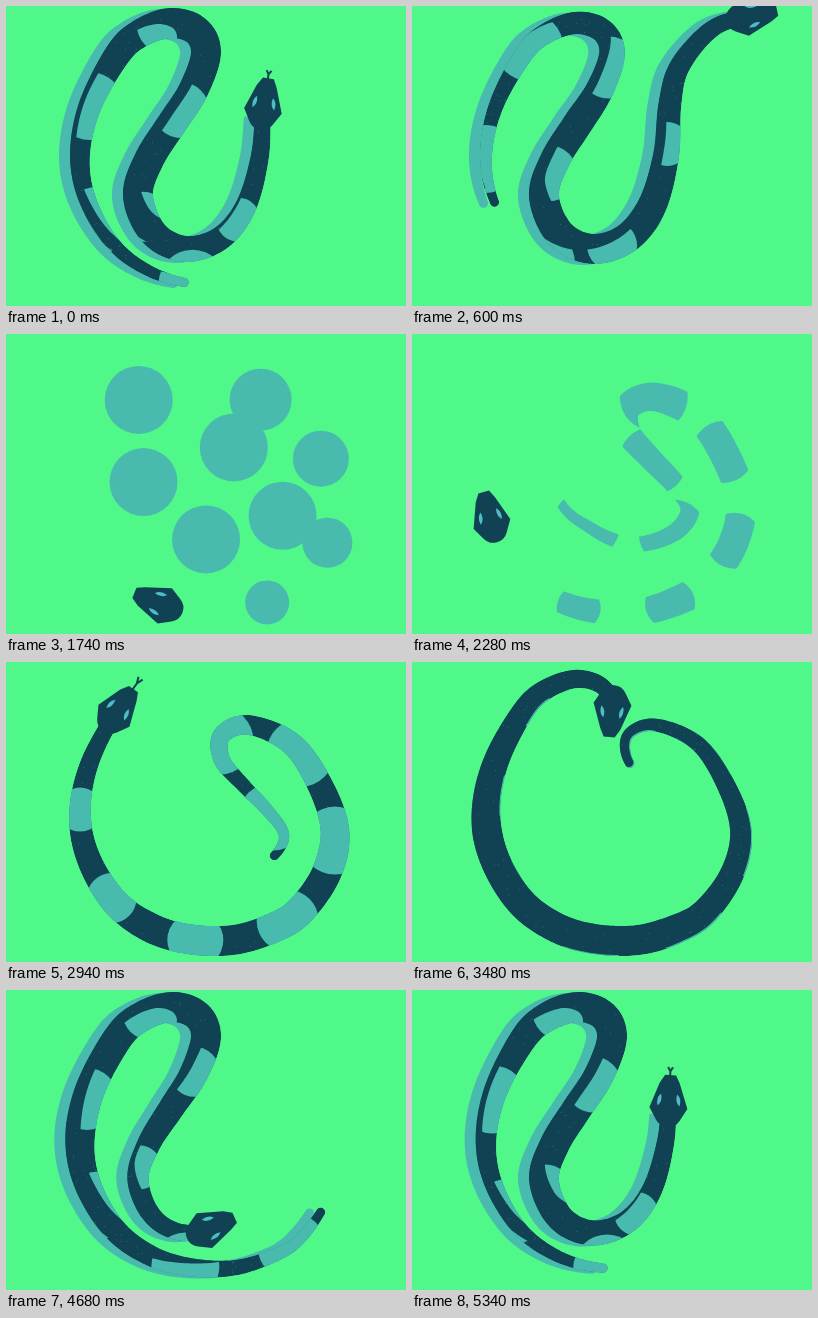
Write an HTML page with a canvas that moves like this. It is 400 by 300 pixels and loops after 5.4 s.

```html
<!DOCTYPE html>
<html>
<head>
<meta charset="utf-8">
<title>Snake</title>
<style>
html, body { margin: 0; width: 100%; height: 100%; overflow: hidden; background: #50f789; }
canvas { display: block; }
</style>
</head>
<body>
<canvas id="stage" width="400" height="300"></canvas>
<script>
const ctx = document.getElementById('stage').getContext('2d');
const GREEN = '#50f789', DARK = '#104254', TEAL = '#48bbae', EYE = '#4fbdc6';
const LOOP = 5400, STEP = 60, CUT = 700;

// Route the head follows; the body trails along it.
const route = [
  [300, -40], [225, -8], [169, 27], [122, 90], [147, 166], [180, 195], [212, 209], [240, 208],
  [267, 195], [278, 173], [262, 149], [238, 124], [216, 98], [216, 73], [243, 63], [286, 82],
  [315, 125], [329, 170], [320, 212], [294, 249], [267, 266], [227, 278], [182, 277], [143, 265],
  [108, 239], [82, 195], [74, 150], [84, 100], [112, 48], [135, 27], [165, 17], [191, 25],
  [200, 48], [187, 85], [165, 119], [143, 154], [132, 190], [148, 228], [180, 243], [215, 232],
  [240, 200], [254, 150], [258, 98], [268, 60], [300, 23], [338, 10], [390, 2]
];
const DETAIL = 24;
const samples = [];

function catmull(a, b, c, d, t) {
  return b + 0.5 * t * (c - a + t * (2 * a - 5 * b + 4 * c - d + t * (3 * (b - c) + d - a)));
}
for (let i = 0, s = 0; i < route.length - 1; i++) {
  const p = [-1, 0, 1, 2].map(k => route[Math.min(route.length - 1, Math.max(0, i + k))]);
  for (let j = 0; j < DETAIL; j++) {
    const [x, y] = [0, 1].map(n => catmull(p[0][n], p[1][n], p[2][n], p[3][n], j / DETAIL));
    const last = samples[samples.length - 1];
    if (last) s += Math.hypot(x - last.x, y - last.y);
    samples.push({ x, y, s });
  }
}
const lengthAt = (x, y) => samples[DETAIL * route.findIndex(p => p[0] === x && p[1] === y)].s;
const endS = lengthAt(258, 98);
const startS = lengthAt(267, 266);
const SPEED = (endS - startS) / 4200;
const LENGTH = endS - lengthAt(182, 277);

function pointAt(s) {
  let lo = 0, hi = samples.length - 1;
  while (hi - lo > 1) {
    const mid = (lo + hi) >> 1;
    if (samples[mid].s > s) hi = mid; else lo = mid;
  }
  const a = samples[lo], b = samples[hi], f = (s - a.s) / (b.s - a.s);
  return {
    x: a.x + (b.x - a.x) * f,
    y: a.y + (b.y - a.y) * f,
    angle: Math.atan2(b.y - a.y, b.x - a.x)
  };
}

// time, distance from head to first band, distance between bands
const spacing = [
  [700, 90, 82], [1200, 90, 82], [2280, 133, 93], [2940, 108, 96],
  [4020, 113, 103], [5400, 120, 119], [6000, 171, 122], [6100, 180, 122]
];
function bandLayout(t) {
  const i = Math.max(1, spacing.findIndex(k => k[0] >= t));
  const a = spacing[i - 1], b = spacing[i], f = (t - a[0]) / (b[0] - a[0]);
  return [1, 2].map(n => a[n] + (b[n] - a[n]) * f);
}

const ease = (t, from, to) => {
  const f = Math.min(1, Math.max(0, (t - from) / (to - from)));
  return f * f * (3 - 2 * f);
};
const halfWidth = d => Math.min(30, 15 + d * 0.06, 9 + (LENGTH - d) * 0.06) / 2;

function bodyPath(head) {
  const left = [], right = [];
  for (let d = 12; d <= LENGTH - 4; d += 3) {
    const { x, y, angle } = pointAt(head - d), w = halfWidth(d);
    const nx = -Math.sin(angle) * w, ny = Math.cos(angle) * w;
    left.push([x + nx, y + ny]);
    right.unshift([x - nx, y - ny]);
  }
  const path = new Path2D();
  left.concat(right).forEach(p => path.lineTo(...p));
  path.closePath();
  const tip = pointAt(head - LENGTH + 4);
  const cap = new Path2D();
  cap.arc(tip.x, tip.y, 4.7, 0, 7);
  path.addPath(cap);
  return path;
}

function fillShifted(path, color, dx, dy) {
  ctx.save();
  ctx.translate(dx, dy);
  ctx.fillStyle = color;
  ctx.fill(path);
  ctx.restore();
}

function drawBands(t, head) {
  const [first, gap] = bandLayout(t);
  ctx.fillStyle = TEAL;
  for (let k = 0; k < 9; k++) {
    const p = pointAt(Math.max(0, head - first - gap * k));
    ctx.beginPath();
    ctx.arc(p.x, p.y, Math.min(34, 22 + 3 * k), 0, 7);
    ctx.fill();
  }
}

function drawSpecks(head) {
  let seed = 7;
  const random = () => (seed = seed * 16807 % 2147483647) / 2147483647;
  ctx.fillStyle = 'rgba(72,187,174,.45)';
  for (let i = 0; i < 90; i++) {
    const d = 20 + random() * (LENGTH - 40), p = pointAt(head - d);
    const off = (random() * 2 - 1) * halfWidth(d);
    ctx.fillRect(p.x - Math.sin(p.angle) * off, p.y + Math.cos(p.angle) * off, 0.9, 0.9);
  }
}

function drawBody(t, head) {
  if (t < 1890) return drawBands(t, head);
  const body = bodyPath(head);
  const dark = t >= 2500;
  const shade = 14 * ease(t, 3400, 3900);
  const slide = 11 * ease(t, 4190, 4330);
  if (slide) fillShifted(body, TEAL, -slide, 1);
  ctx.save();
  ctx.clip(body);
  if (dark) fillShifted(body, DARK, 0, 0);
  drawBands(t, head);
  if (shade) fillShifted(body, DARK, -shade, -shade);
  if (dark) drawSpecks(head);
  ctx.restore();
}

const flick = (t, middle, size) => size * Math.max(0, 1 - ((t - middle) / 230) ** 2);

function drawHead(t, head) {
  const { x, y, angle } = pointAt(head);
  ctx.save();
  ctx.translate(x, y);
  ctx.rotate(angle + Math.PI / 2);
  ctx.fillStyle = ctx.strokeStyle = DARK;

  const tongue = flick(t, 2940, 13) + flick(t, 5370, 8);
  if (tongue > 1) {
    ctx.lineWidth = 2;
    ctx.beginPath();
    ctx.moveTo(0, -24);
    ctx.lineTo(0, -26 - tongue * 0.5);
    ctx.lineTo(-2.5, -26 - tongue);
    ctx.moveTo(0, -26 - tongue * 0.5);
    ctx.lineTo(2.5, -26 - tongue);
    ctx.stroke();
  }

  ctx.fill(new Path2D('M-5-26H6L10-18 19 7 12 19Q8 26 0 26T-12 19L-19 7-10-18Z'));
  ctx.fillStyle = EYE;
  ctx.fill(new Path2D('M-8-7Q-13-3-11 5Q-6 1-8-7ZM8-7Q13-3 11 5Q6 1 8-7Z'));
  ctx.restore();
}

function frame(now) {
  let t = Math.floor(now % LOOP / STEP) * STEP;
  if (t < CUT) t += LOOP;
  const head = startS + SPEED * (t - 1200);
  ctx.fillStyle = GREEN;
  ctx.fillRect(0, 0, 400, 300);
  drawBody(t, head);
  drawHead(t, head);
  requestAnimationFrame(() => frame(performance.now() - begin));
}
const begin = performance.now();
frame(0);
</script>
</body>
</html>
```
